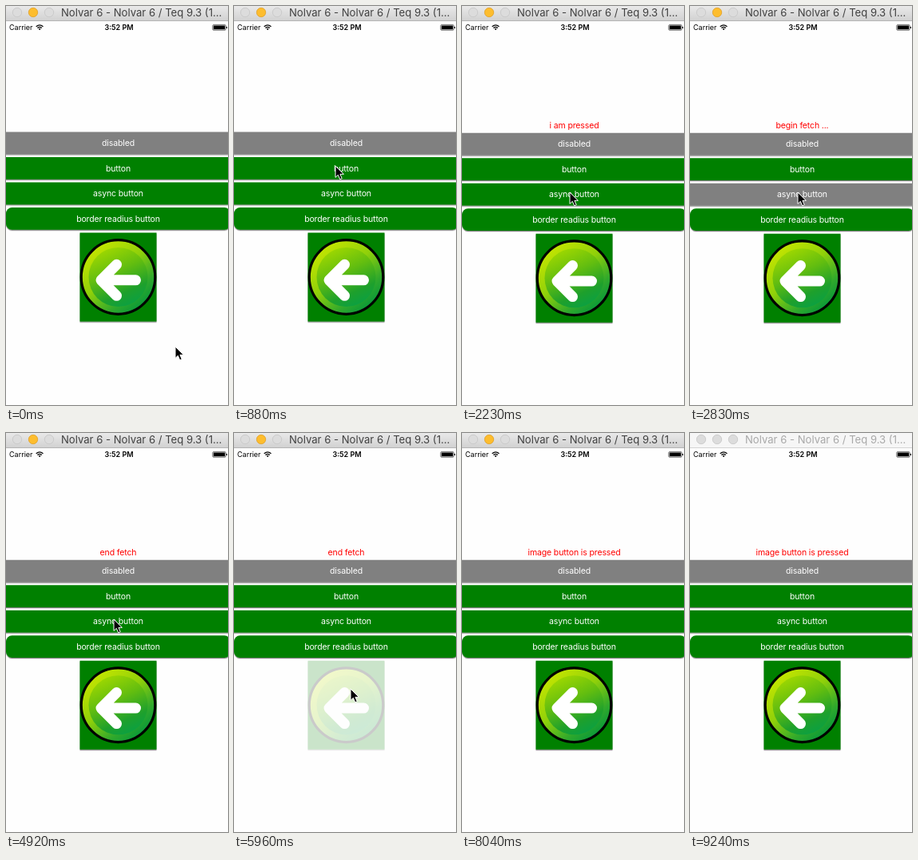
These frames come from a looping animation (278 by 499 pixels, 9340 ms). An HTML page:

```html
<!DOCTYPE html>
<html lang="en">
<head>
<meta charset="utf-8">
<title>Button demo</title>
<style>
html, body { margin: 0; width: 100%; height: 100%; overflow: hidden; background: #fefefe; }
svg { display: block; width: 278px; height: 499px; }
text { font-family: Inter, Roboto, sans-serif; }
.label { font-size: 10.5px; letter-spacing: -.13px; text-anchor: middle; fill: #fff; }
#message { fill: #f00; }
.status { font-size: 9px; }
</style>
</head>
<body>
<svg viewBox="0 0 278 499" xmlns="http://www.w3.org/2000/svg">
  <defs>
    <linearGradient id="chrome" x2="0" y2="1">
      <stop stop-color="#e9e9e9"/><stop offset="1" stop-color="#d1d1d1"/>
    </linearGradient>
    <linearGradient id="rim" x1=".15" y1=".1" x2=".8" y2=".9">
      <stop stop-color="#c6e600"/><stop offset=".45" stop-color="#8fd00a"/>
      <stop offset=".8" stop-color="#2fa82c"/><stop offset="1" stop-color="#0b9a38"/>
    </linearGradient>
    <linearGradient id="disc" x1=".3" y1="0" x2=".75" y2="1">
      <stop stop-color="#a0d800"/><stop offset=".4" stop-color="#62bd10"/>
      <stop offset=".75" stop-color="#1ea02c"/><stop offset="1" stop-color="#08a046"/>
    </linearGradient>
    <filter id="shadow" x="-5%" y="-20%" width="110%" height="150%">
      <feDropShadow dx="0" dy="1.2" stdDeviation=".7" flood-color="#000" flood-opacity=".5"/>
    </filter>
  </defs>

  <rect width="278" height="499" fill="#fefefe"/>

  <rect id="bar" width="278" height="18.5"/>
  <rect id="edge" y="18" width="278" height="1"/>
  <g stroke-width=".8">
    <circle class="light" cx="14" cy="8" r="5.7" fill="#dcdcdc" stroke="#c6c6c6"/>
    <circle id="yellow" cx="34" cy="8" r="5.7"/>
    <circle class="light" cx="54" cy="8" r="5.7" fill="#dcdcdc" stroke="#c6c6c6"/>
  </g>
  <text id="title" x="69" y="13" font-size="13.1">Nolvar 6 - Nolvar 6 / Teq 9.3 (1...</text>

  <text class="status" x="4" y="30">Carrier</text>
  <g fill="none" stroke="#000" stroke-width="1.2">
    <path d="M37.7 25.8Q42.1 21.9 46.5 25.8M39.4 27.5Q42.1 25.2 44.8 27.5"/>
    <path d="M42.1 30.2L40.6 28.6Q42.1 27.4 43.6 28.6Z" fill="#000" stroke="none"/>
  </g>
  <text class="status" x="141.5" y="30" font-weight="600" text-anchor="middle">3:52 PM</text>
  <rect x="258.8" y="23.6" width="16.4" height="6.6" rx="1.2" fill="none" stroke="#000" stroke-width=".6"/>
  <rect x="259.8" y="24.6" width="14.4" height="4.6" rx=".5"/>
  <rect x="275.9" y="25.8" width="1" height="2.3" rx=".5"/>

  <text id="message" class="label" x="140.5" y="152.5"></text>
  <g id="list">
    <g id="rows"></g>
    <g id="picture">
      <rect x="92.5" y="283.5" width="96" height="111" fill="#008000" filter="url(#shadow)"/>
      <circle cx="140.5" cy="339" r="46.3" fill="url(#rim)" stroke="#000" stroke-width="3.2"/>
      <circle cx="140.5" cy="339" r="37" fill="url(#disc)"/>
      <path d="M138.5 323.3L119 342.8L138.5 362.3M119 342.8H162.5" fill="none" stroke="#fff"
        stroke-width="13" stroke-linecap="round" stroke-linejoin="round"/>
    </g>
  </g>
  <path id="cursor" d="M1 1V15.4L4.3 12.3L6.7 17.8L9.2 16.7L6.9 11.3H11.4Z" fill="#000"
    stroke="#fff" stroke-width="1" stroke-linejoin="round"/>
</svg>
<script>
const LOOP = 9340;
const $ = id => document.getElementById(id);

// [time, value]: each value holds until the next time
const messages = [[0, ''], [1330, 'i am pressed'], [2830, 'begin fetch ...'],
  [4920, 'end fetch'], [6110, 'image button is pressed']];
const pointer = [[0, [211, 425]], [450, [176, 286]], [590, [149, 231]], [740, [125, 200]],
  [880, [126, 199]], [1930, [131, 221]], [2080, [134, 231]], [2230, [134, 232]],
  [5370, [140, 292]], [5520, [145, 319]], [7160, [146, 321.5]], [7310, [205, 468]],
  [7600, [205.5, 468.5]], [7750, [222, 484]], [7890, [226, 492]], [8040, null]];

const at = (track, t) => track.filter(k => k[0] <= t).pop()[1];
const within = (t, from, to) => t >= from && t < to;

function make(parent, tag, attrs) {
  const el = document.createElementNS('http://www.w3.org/2000/svg', tag);
  for (const name in attrs) el.setAttribute(name, attrs[name]);
  return parent.appendChild(el);
}

const rows = ['disabled', 'button', 'async button', 'border readius button'].map((name, i) => {
  const y = 157.5 + 31.5 * i;
  const group = make($('rows'), 'g', {});
  const box = make(group, 'rect', {
    x: 0, y, width: 281, height: 27.75, rx: i === 3 ? 7.5 : 0,
    fill: i ? '#008000' : '#808080', filter: 'url(#shadow)'
  });
  make(group, 'text', { class: 'label', x: 140.5, y: y + 17.7 }).textContent = name;
  return { group, box };
});

function render(t) {
  const active = t < 9240;
  $('bar').setAttribute('fill', active ? 'url(#chrome)' : '#f6f6f6');
  $('edge').setAttribute('fill', active ? '#b4b4b4' : '#d4d4d4');
  $('yellow').setAttribute('fill', active ? '#fdbd2e' : '#dcdcdc');
  $('yellow').setAttribute('stroke', active ? '#e0a028' : '#c6c6c6');
  $('title').setAttribute('fill', active ? '#404040' : '#a8a8a8');

  $('message').textContent = at(messages, t);
  $('list').setAttribute('transform', `translate(0 ${t < 1330 ? 0 : 1.25})`);
  rows[1].group.setAttribute('opacity', within(t, 1180, 1330) ? 0.2 : 1);
  rows[2].box.setAttribute('fill', within(t, 2830, 4920) ? '#808080' : '#008000');
  $('picture').setAttribute('opacity', within(t, 5960, 6110) ? 0.2 : 1);

  const pos = at(pointer, t);
  $('cursor').setAttribute('visibility', pos ? 'visible' : 'hidden');
  if (pos) $('cursor').setAttribute('transform', `translate(${pos})`);
}

const start = performance.now();
function frame() {
  render((performance.now() - start) % LOOP);
  requestAnimationFrame(frame);
}
frame();
</script>
</body>
</html>
```
